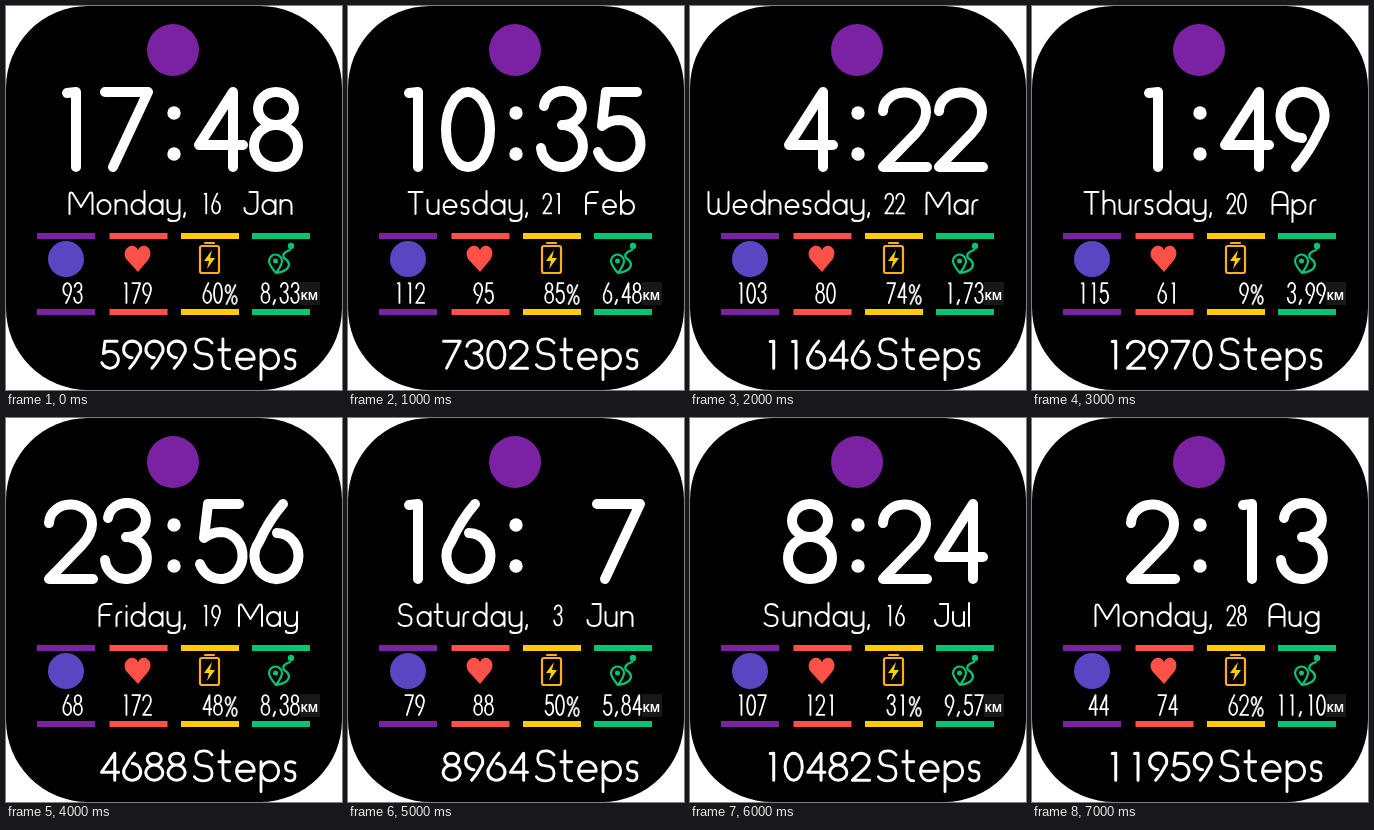
An HTML page with a canvas for the animation above (8000 ms loop, 336 by 384 pixels).

```html
<!DOCTYPE html>
<html lang="en">
<head>
<meta charset="utf-8">
<title>Watch face</title>
<style>
html, body { margin: 0; width: 336px; height: 384px; overflow: hidden; background: #fff; }
canvas { display: block; }
</style>
</head>
<body>
<canvas id="face" width="336" height="384" role="img"></canvas>
<script>
const face = document.getElementById('face');
const ctx = face.getContext('2d');
const PURPLE = '#7b22a2', RED = '#ff5148', YELLOW = '#ffcc00', GREEN = '#05c474';

// Monoline digits in a 55 x 86 cell
const DIGITS = {
  0: 'M27 6A22 37.5 0 1 1 27 81A22 37.5 0 1 1 27 6',
  1: 'M24 7L33 6V81',
  2: 'M6 25A21.5 19 0 0 1 49 26Q49 36 39 47L6 81H50',
  3: 'M9 20A19 17 0 1 1 27 39A21 21 0 1 1 6 62',
  4: 'M40 81V6L6 59H50',
  5: 'M46 6H15L11 40Q19 34 28 34A22 23.5 0 1 1 7 66',
  6: 'M34 6Q20 22 10 44A22 23 0 1 0 28 35',
  7: 'M6 6H49L14 81',
  8: 'M27 6A18 16.5 0 1 1 27 39A18 16.5 0 1 1 27 6M27 39A22 21 0 1 1 27 81A22 21 0 1 1 27 39',
  9: 'M21 81Q35 65 45 43A22 23 0 1 0 27 52'
};

// Monoline letters: [advance, path], baseline at 23
const BOWL = 'M1 16a6.5 7 0 1 1 13 0a6.5 7 0 1 1-13 0';
const ARCH = 'M1 15Q1 9 6.5 9T12 15V23';
const LETTERS = {
  A: [17, 'M1 23V9Q1 1 8.5 1T16 9V23M1 14H16'],
  F: [14, 'M1 23V7Q1 1 7 1H13M1 12H11'],
  J: [15, 'M6 1H14V16Q14 23 7.5 23T1 17'],
  M: [25, 'M1 23V5Q1 0 4 2L12.5 16L21 2Q24 0 24 5V23'],
  S: [16, 'M14 4Q12 1 8 1Q2 1 2 6.5T8 12T14 17.5T8 23Q3 23 1 20'],
  T: [16, 'M1 1H15M8 1V23'],
  W: [22, 'M1 1V17Q1 23 6 23T11 17V8M11 17Q11 23 16 23T21 17V1'],
  a: [15, BOWL + 'M14 9V23'],
  b: [15, BOWL + 'M1 0V23'],
  d: [15, BOWL + 'M14 0V23'],
  e: [15, 'M1 16H14A6.5 7 0 1 0 12 21'],
  g: [15, BOWL + 'M14 9V25Q14 30 7.5 30T2 28'],
  h: [13, 'M1 0V23' + ARCH],
  i: [2, 'M1 9V23M1 3v.5'],
  l: [2, 'M1 0V23'],
  n: [13, 'M1 9V23' + ARCH],
  o: [15, BOWL],
  p: [15, BOWL + 'M1 9V31'],
  r: [7, 'M1 23V15Q1 9 6 9'],
  s: [9, 'M8 10Q7 9 4.5 9Q1 9 1 12.5T4.5 16T8 19.5T4.5 23Q2 23 1 21.5'],
  t: [9, 'M3 1V18Q3 23 8 23M0 9H8'],
  u: [13, 'M1 9V17Q1 23 6.5 23T12 17M12 9V23'],
  y: [14, 'M1 9V17Q1 23 7 23T13 17M13 9V25Q13 30 7 30T2 28'],
  ',': [2, 'M1.5 22L.5 26']
};

const STATES = [
  { time: '17:48', day: 'Monday', date: 16, month: 'Jan', stats: [93, 179, 60], km: '8,33', steps: 5999 },
  { time: '10:35', day: 'Tuesday', date: 21, month: 'Feb', stats: [112, 95, 85], km: '6,48', steps: 7302 },
  { time: '4:22', day: 'Wednesday', date: 22, month: 'Mar', stats: [103, 80, 74], km: '1,73', steps: 11646 },
  { time: '1:49', day: 'Thursday', date: 20, month: 'Apr', stats: [115, 61, 9], km: '3,99', steps: 12970 },
  { time: '23:56', day: 'Friday', date: 19, month: 'May', stats: [68, 172, 48], km: '8,38', steps: 4688 },
  { time: '16:7', day: 'Saturday', date: 3, month: 'Jun', stats: [79, 88, 50], km: '5,84', steps: 8964 },
  { time: '8:24', day: 'Sunday', date: 16, month: 'Jul', stats: [107, 121, 31], km: '9,57', steps: 10482 },
  { time: '2:13', day: 'Monday', date: 28, month: 'Aug', stats: [44, 74, 62], km: '11,10', steps: 11959 }
];

function line(d, color, width, x = 0, y = 0, sx = 1, sy = sx) {
  const path = new Path2D();
  path.addPath(new Path2D(d), new DOMMatrix([sx, 0, 0, sy, x, y]));
  ctx.strokeStyle = color;
  ctx.lineWidth = width;
  ctx.stroke(path);
}

function fill(d, color) {
  ctx.fillStyle = color;
  ctx.fill(new Path2D(d));
}

function dot(x, y, r, color) {
  ctx.fillStyle = color;
  ctx.beginPath();
  ctx.arc(x, y, r, 0, 2 * Math.PI);
  ctx.fill();
}

function number(value, right, top, pitch, sx, sy, width) {
  [...String(value)].reverse().forEach((digit, i) =>
    line(DIGITS[digit], '#fff', width, right - 55 * sx - i * pitch, top, sx, sy));
}

const small = (value, right, top = 275.5) => number(value, right, top, 10.8, 0.18, 0.265, 1.8);

// align: 0 left, 0.5 centre, 1 right
function word(text, x, top, align, scale, width) {
  const glyphs = [...text].map(c => LETTERS[c]);
  const total = glyphs.reduce((sum, [w]) => sum + w + 3, -3);
  x -= total * scale * align;
  for (const [w, d] of glyphs) {
    line(d, '#fff', width, x, top, scale);
    x += (w + 3) * scale;
  }
}

function drawIcons() {
  dot(60, 253, 18, '#5b46c2');
  fill('M132 266L121 254C115 246 122 238 128 240Q131 241 132 244Q133 241 136 240C142 238 148 246 142 254Z', RED);
  line('M196 240H211Q213 240 213 242V265Q213 267 211 267H196Q194 267 194 265V242Q194 240 196 240ZM199 237H208', '#ffae18', 2.2);
  fill('M206 244L198 255H203L201 263L209 252H204Z', YELLOW);
  line('M270 267Q263 259 263 255A6.5 6.5 0 0 1 276 255Q276 259 270 267Q283 265 283 258Q282 254 278 252Q275 247 284 244', GREEN, 2.2);
  dot(269.5, 255, 2.5, GREEN);
  dot(285, 240, 3.2, GREEN);
}

function draw({ time, day, date, month, stats, km, steps }) {
  ctx.clearRect(0, 0, 336, 384);
  ctx.lineCap = ctx.lineJoin = 'round';
  ctx.fillStyle = '#000';
  ctx.beginPath();
  ctx.roundRect(0, 0, 336, 384, 82);
  ctx.fill();

  dot(167, 44, 26, PURPLE);

  const [hours, minutes] = time.split(':');
  number(hours, 148, 80, 56, 1, 1, 10);
  number(minutes, 298, 80, 56, 1, 1, 10);
  dot(168, 107, 6.7, '#fff');
  dot(168, 148, 6.7, '#fff');

  word(day + ',', 179.5, 185, 1, 1, 2);
  small(date, 215, 186);
  word(month, 262, 185, 0.5, 1, 2);

  [[31, PURPLE], [103.5, RED], [175, YELLOW], [246, GREEN]].forEach(([x, color]) => {
    ctx.fillStyle = color;
    ctx.fillRect(x, 227, 58, 6);
    ctx.fillRect(x, 303, 58, 6);
  });
  drawIcons();

  [77, 146, 217].forEach((right, i) => small(stats[i], right));
  line('M222 279a2.4 4 0 1 1-.1 0M228.5 290a2.4 4 0 1 1-.1 0M229.5 279L220.5 298', '#e4e4e4', 1.9);
  const [whole, decimals] = km.split(',');
  small(whole, 264.5);
  line('M269 294L267.5 298', '#fff', 2);
  small(decimals, 294);
  ctx.fillStyle = '#181818';
  ctx.fillRect(294, 276, 20, 23);
  ctx.fillStyle = '#fff';
  ctx.font = 'bold 11px "Noto Sans", sans-serif';
  ctx.fillText('KM', 294.5, 294);

  number(steps, 181.5, 333, 22.3, 0.39, 0.36, 3);
  word('Steps', 187, 331.5, 0, 1.36, 2.8);

  face.setAttribute('aria-label', `${time} ${day}, ${date} ${month}, ${km} KM, ${steps} Steps`);
}

let shown = -1;
function tick() {
  const index = Math.floor(performance.now() / 1000) % STATES.length;
  if (index !== shown) draw(STATES[shown = index]);
  requestAnimationFrame(tick);
}
tick();
</script>
</body>
</html>
```
